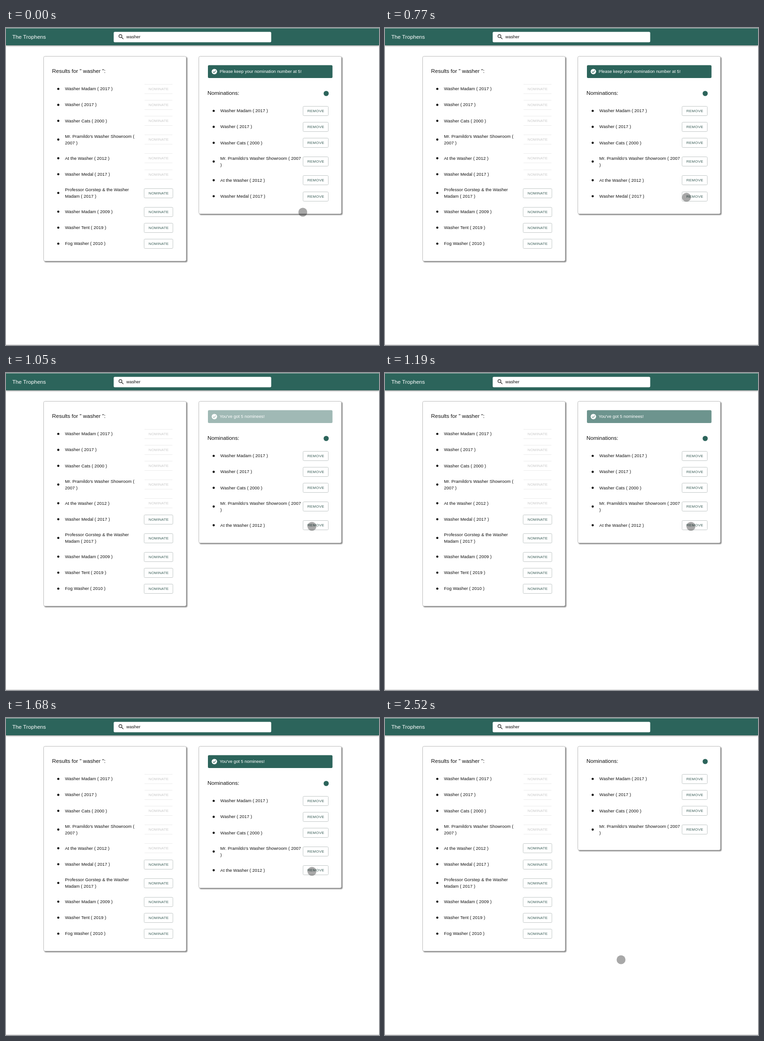
These frames come from a looping animation (798x678 px, 2590 ms). An HTML page:

```html
<!DOCTYPE html>
<html lang="en">
<head>
<meta charset="utf-8">
<title>Nominations</title>
<style>
  html, body { margin: 0; width: 100%; height: 100%; overflow: hidden; background: #fff; }
  body { position: relative; font-family: "Liberation Sans", Arial, sans-serif; }
  header, .card, footer, svg { position: absolute; box-sizing: border-box; }
  header {
    left: 0; top: 0; width: 798px; height: 37px; background: #2c645b;
    border-top: 1px solid #a3b9b5; box-shadow: 0 1px 3px rgba(0, 0, 0, .5);
  }
  footer { left: 0; top: 677px; width: 798px; height: 1px; background: #cfcfcf; }
  .card {
    top: 60px; width: 306px; background: #fff; border: 1px solid #bbb;
    border-radius: 3.5px; box-shadow: 2px 2px 2px #888;
  }
  #results { left: 80px; height: 439px; }
  #picks { left: 412px; height: 338px; }
  svg { left: 0; top: 0; }
  text { fill: #111; font-size: 9.33px; }
  .row { letter-spacing: .08px; }
  .title { font-size: 11.67px; }
  .light { fill: #fff; }
  .button text { fill: #3c5f59; font-size: 8px; letter-spacing: .2px; text-anchor: middle; }
  .button rect { fill: #fff; stroke: #c2c8c7; }
  .disabled text { fill: #c8c8c8; }
  .disabled path { stroke: #ececec; }
</style>
</head>
<body>
<header></header>
<div class="card" id="results"></div>
<div class="card" id="picks"></div>
<footer></footer>
<svg id="stage" width="798" height="678" viewBox="0 0 798 678">
  <text class="title light" x="13.5" y="22.5">The Trophens</text>
  <rect x="230.4" y="8.2" width="337" height="22.4" rx="2.5" fill="#fff"/>
  <g fill="none" stroke="#222" stroke-width="1.25">
    <circle cx="244.8" cy="17.3" r="3.2"/>
    <path d="M247.2 19.7L251.1 23.6"/>
  </g>
  <text x="257.5" y="22">washer</text>
  <text class="title" x="98.5" y="96">Results for " washer ":</text>
</svg>
<script>
const LOOP = 2590, FIRST_REMOVAL = 840, SECOND_REMOVAL = 1820;
const ROW = 34.2, TALL_ROW = 45.8, FIRST_ROW_Y = 130, ALERT_SPACE = 47;
const stage = document.getElementById('stage');

const films = [
  ['Washer Madam ( 2017 )'],
  ['Washer ( 2017 )'],
  ['Washer Cats ( 2000 )'],
  ["Mr. Pramildo's Washer Showroom (", '2007 )'],
  ['At the Washer ( 2012 )'],
  ['Washer Medal ( 2017 )'],
  ['Professor Gorstep & the Washer', 'Madam ( 2017 )'],
  ['Washer Madam ( 2009 )'],
  ['Washer Tent ( 2019 )'],
  ['Fog Washer ( 2010 )']
];
const picks = films.slice(0, 6);
picks[3] = ["Mr. Pramildo's Washer Showroom ( 2007", ')'];

function add(parent, tag, attrs = {}, content = '') {
  const el = document.createElementNS('http://www.w3.org/2000/svg', tag);
  for (const key in attrs) el.setAttribute(key, attrs[key]);
  el.textContent = content;
  return parent.appendChild(el);
}

// Each stop [time, value] holds until the next one.
function hold(el, property, stops) {
  el.animate(
    stops.map(([time, value]) => ({ offset: time / LOOP, [property]: value, easing: 'step-end' })),
    { duration: LOOP, iterations: Infinity }
  );
}

const showUntil = (el, time) => hold(el, 'opacity', [[0, 1], [time, 0]]);
const showFrom = (el, time) => hold(el, 'opacity', [[0, 0], [time, 1]]);

function addButton(parent, label, x, y, width, disabled) {
  const top = Math.round(y) - 9.5;
  const g = add(parent, 'g', { class: disabled ? 'button disabled' : 'button' });
  if (disabled) add(g, 'path', { d: `M${x + 1} ${top}h${width - 2}m0 20h${2 - width}` });
  else add(g, 'rect', { x, y: top, width, height: 20, rx: 2 });
  add(g, 'text', { x: x + width / 2 + .3, y: y + 3 }, label);
  return g;
}

function addRows(parent, list, x, addControl) {
  let top = FIRST_ROW_Y - ROW / 2;
  list.forEach((lines, i) => {
    const height = lines.length > 1 ? TALL_ROW : ROW;
    const y = top + height / 2;
    const row = add(parent, 'g');
    add(row, 'circle', { cx: x, cy: y + .2, r: 2.3 });
    lines.forEach((line, n) => add(row, 'text', {
      class: 'row', x: x + 14.3, y: y + 3.2 + 14 * (n - (lines.length - 1) / 2)
    }, line));
    addControl(row, y, i);
    top += height;
  });
}

function addAlert(message) {
  const g = add(stage, 'g');
  add(g, 'rect', { x: 432, y: 79.5, width: 266.5, height: 27.5, rx: 2.5, fill: '#2c645b' });
  add(g, 'circle', { cx: 445.8, cy: 93.2, r: 5.8, fill: '#fff' });
  add(g, 'path', { d: 'M442.8 93.3l2.1 2.1 4-4.2', fill: 'none', stroke: '#2c645b', 'stroke-width': 1.2 });
  add(g, 'text', { class: 'light', x: 457, y: 96.3 }, message);
  return g;
}

addRows(stage, films, 111.9, (row, y, i) => {
  const button = disabled => addButton(row, 'NOMINATE', 295.5, y, 61.5, disabled);
  const enabledAt = { 4: SECOND_REMOVAL, 5: FIRST_REMOVAL }[i];
  if (enabledAt) {
    showUntil(button(true), enabledAt);
    showFrom(button(false), enabledAt);
  } else {
    button(i < 4);
  }
});

const nominations = add(stage, 'g');
add(nominations, 'text', { class: 'title', x: 431, y: 96 }, 'Nominations:');
add(nominations, 'circle', { cx: 685, cy: 93, r: 5.5, fill: '#2c645b' });
addRows(nominations, picks, 444.3, (row, y, i) => {
  addButton(row, 'REMOVE', 635.5, y, 54, false);
  if (i === 4) showUntil(row, SECOND_REMOVAL);
  if (i === 5) showUntil(row, FIRST_REMOVAL);
});
hold(nominations, 'transform', [[0, `translateY(${ALERT_SPACE}px)`], [SECOND_REMOVAL, 'translateY(0px)']]);
hold(document.getElementById('picks'), 'height',
  [[0, '338px'], [FIRST_REMOVAL, '303.5px'], [SECOND_REMOVAL, '222.5px']]);

showUntil(addAlert('Please keep your nomination number at 5!'), FIRST_REMOVAL);

const fade = [.05, .17, .3, .45, .58, .69, .78, .85, .9, .94, .965, .985, 1];
hold(addAlert("You've got 5 nominees!"), 'opacity', [
  [0, 0], ...fade.map((value, i) => [FIRST_REMOVAL + 70 * i, value]), [SECOND_REMOVAL, 0]
]);

const path = [
  [0, 635, 394], [70, 635, 391], [140, 636, 386], [210, 638, 380], [280, 640, 374],
  [350, 642, 369], [420, 644, 365], [490, 645, 363], [560, 645, 362],
  [840, 646, 354], [910, 649.5, 340], [980, 653, 332], [1050, 654.5, 328],
  [2380, 643, 342], [2450, 590, 410], [2520, 505, 517]
];
const pointer = add(stage, 'circle', { r: 9.5, fill: '#000', 'fill-opacity': .34 });
hold(pointer, 'transform', path.map(([time, x, y]) => [time, `translate(${x}px, ${y}px)`]));
</script>
</body>
</html>
```
